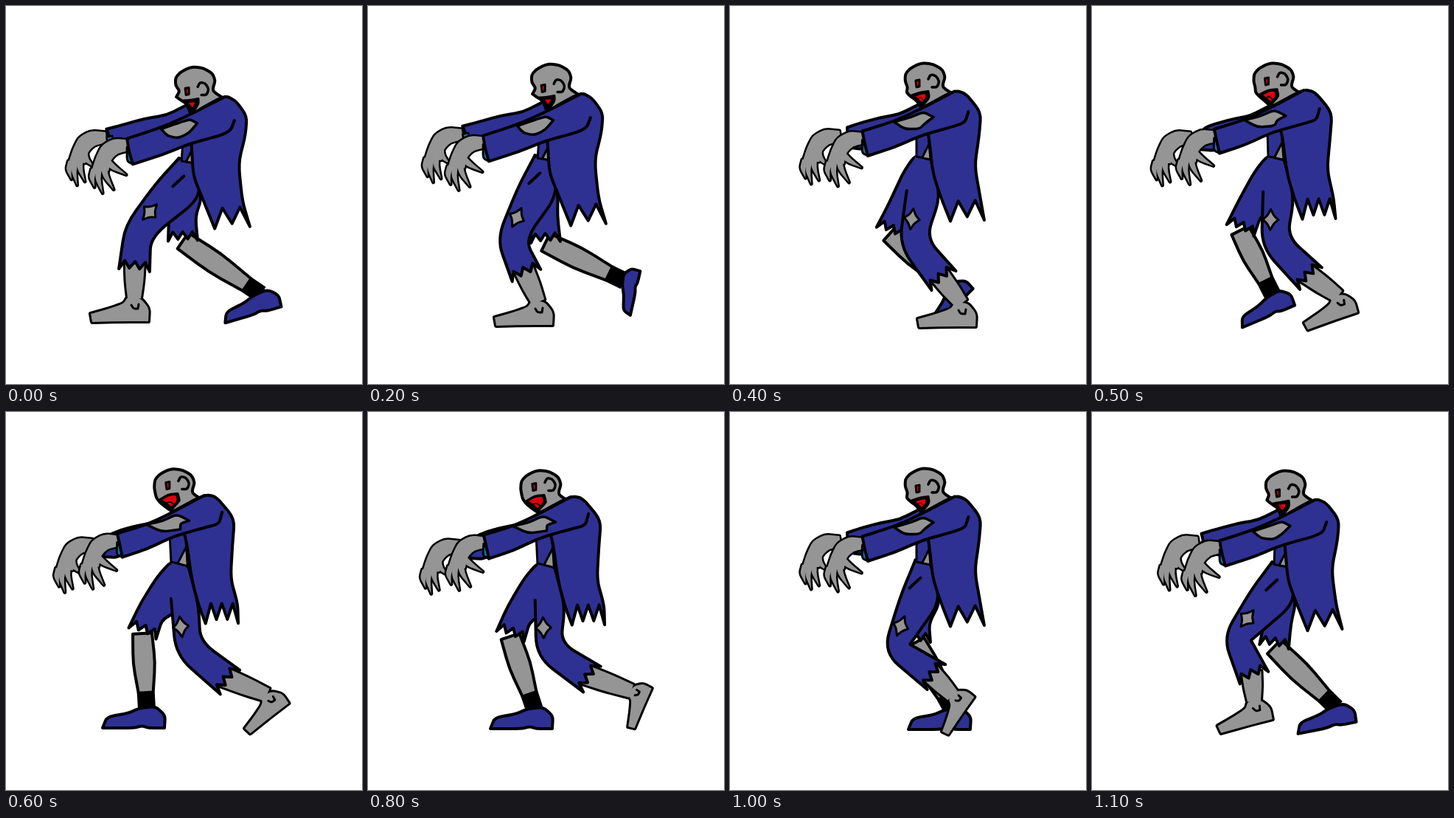
Animation, 483 px wide and 512 px high, one loop 1200 ms. Source, as an HTML page with a canvas:

```html
<!DOCTYPE html>
<html lang="en">
<head>
<meta charset="utf-8">
<title>Zombie walk</title>
<style>
html, body { margin: 0; width: 100%; height: 100%; overflow: hidden; background: #fff; }
canvas { display: block; }
</style>
</head>
<body>
<canvas id="stage" width="483" height="512"></canvas>
<script>
const ctx = document.getElementById('stage').getContext('2d');
const BLUE = '#2e3192', GRAY = '#959595', CYAN = '#0f75bc', RED = '#e0000f', INK = '#000';
const LOOP = 1200, STEP = 100, LINE = 4;

// Key joints. Legs: knee, trouser hem, ankle, foot tilt.
const poses = [
  { at: 0, neck: [297, 121], near: [179, 305, 174, 358, 174, 396, 0], far: [239, 285, 240, 318, 345, 390, -.28] },
  { at: 200, neck: [289, 117], near: [194, 316, 215, 365, 231, 401, 0], far: [239, 285, 241, 320, 347, 372, -1.35] },
  { at: 400, neck: [305, 114], near: [248, 319, 290, 372, 314, 403, 0], far: [232, 275, 217, 308, 300, 382, -.8] },
  { at: 600, neck: [269, 112], near: [247, 320, 304, 366, 354, 383, -.65], far: [198, 268, 185, 300, 191, 402, 0] },
  { at: 800, neck: [275, 114], near: [245, 322, 304, 362, 357, 378, -1.15], far: [205, 272, 193, 304, 226, 403, 0] },
  { at: 1000, neck: [305, 113], near: [226, 320, 280, 359, 302, 384, -.95], far: [252, 285, 252, 312, 302, 404, 0] },
  { at: 1100, neck: [303, 117], near: [197, 307, 220, 360, 220, 392, -.25], far: [252, 285, 247, 318, 331, 400, -.2] }
];

// Upper body, relative to the neck: upright and twisted forms
const body = {
  jacket: [[-47,26, 0,0, 15,8, 29,28, 27,53, 17,90, 22,143, 33,178, -15,181, -33,137, -45,108, -47,66],
           [-43,23, 0,0, 16,2, 42,33, 39,70, 37,115, 47,148, 47,174, 3,174, -6,150, -15,115, -24,52]],
  sleeve: [[0,2, -47,26, -85,43, -134,59, -131,78, -126,94, -85,81, -48,66, -6,55, 7,48, 12,35],
           [0,1, -43,24, -77,40, -117,52, -113,69, -110,84, -77,73, -42,56, 0,44, 21,39, 25,23]],
  farSleeve: [[-163,45, -147,41, -111,31, -80,26, -52,12, -44,30, -127,75, -152,70],
              [-129,56, -110,48, -90,43, -70,39, -43,25, -40,40, -115,86, -137,85]],
  elbow: [[-87,46, -62,37, -48,33, -39,38, -50,52, -66,59, -80,55],
          [-78,40, -57,36, -37,26, -19,35, -31,38, -30,46, -56,50]],
  jaw: [[-49,13, -60,6, -66,2, -61,-6, -67,-14], [-54,16, -61,10, -65,4, -67,-2, -68,-10]],
  mouth: [[-56,7, -46,7, -36,5, -36,12, -44,24, -49,17], [-61,7, -49,-1, -36,-2, -33,8, -44,19, -54,11]],
  vest: [[-58,66, -60,89, -45,91, -48,65], [-46,55, -44,91, -21,97, -24,52]],
  wrists: [[-132,61, -163,49], [-115,55, -150,61]],
  belt: [[-64,85, -46,88], [-43,90, -20,97]]
};
const skull = [-67,-24, -61,-31, -52,-36, -43,-39, -29,-37, -17,-30, -13,-20, -16,-11, -16,-6, -8,0, 0,4];
const ear = [-37,-11, -34,-17, -27,-16, -22,-8, -25,0, -32,0];
const bareFoot = [-9,-2, -14,7, -34,14, -59,21, -57,32, -16,31, 19,31, 20,14, 9,0];
const shoe = [-9,-1, -26,6, -54,11, -60,26, -18,26, -6,23, 2,26, 24,26, 25,9, 12,-3];
const ankleMark = [-4,9, -1,14, 5,14, 6,8];
const palm = [0,0, -20,-2, -36,7, -44,23, -50,42, -27,42, -24,27, -15,18, 2,14];
const fingers = [64, 72, 67, 47];

const add = (p, q, k = 1) => [p[0] + q[0] * k, p[1] + q[1] * k];
const lerp = (p, q, k) => p.map((v, i) => v + (q[i] - v) * k);
const unit = (p, q) => {
  const d = Math.hypot(q[0] - p[0], q[1] - p[1]) || 1;
  return [(q[0] - p[0]) / d, (q[1] - p[1]) / d];
};
const normal = d => [-d[1], d[0]];

// Flat coordinates to points, turned, scaled and moved
function place(flat, [x, y], turn = 0, size = 1) {
  const c = Math.cos(turn) * size, s = Math.sin(turn) * size, out = [];
  for (let i = 0; i < flat.length; i += 2)
    out.push([x + flat[i] * c - flat[i + 1] * s, y + flat[i] * s + flat[i + 1] * c]);
  return out;
}

// Gentle bends are rounded, sharp corners stay sharp
function trace(pts, open) {
  const n = pts.length;
  ctx.beginPath();
  pts.forEach((p, i) => {
    const a = pts[(i + n - 1) % n], b = pts[(i + 1) % n];
    const u = unit(a, p), v = unit(p, b);
    if ((open && (i === 0 || i === n - 1)) || u[0] * v[0] + u[1] * v[1] < .3) return ctx.lineTo(...p);
    ctx.lineTo(...lerp(p, a, .35));
    ctx.quadraticCurveTo(...p, ...lerp(p, b, .35));
  });
  if (!open) ctx.closePath();
}

function fill(pts, color) {
  trace(pts);
  ctx.fillStyle = color;
  ctx.fill();
}

function line(pts, width = LINE, open = true) {
  trace(pts, open);
  ctx.lineWidth = width;
  ctx.stroke();
}

function shape(pts, color, width) {
  fill(pts, color);
  line(pts, width, false);
}

// One outline around several overlapping shapes
function union(shapes, color, width = 6) {
  shapes.forEach(s => line(s, width, false));
  shapes.forEach(s => fill(s, color));
}

// Torn edge from a to b
function rag(a, b, tips, depth) {
  const n = normal(unit(a, b)), last = 2 * tips - 2;
  return Array.from({ length: last + 1 }, (_, i) => {
    const cut = i % 2 ? depth : i && i < last ? depth * .2 : 0;
    return add(lerp(a, b, i / last), n, cut);
  });
}

function limb(a, b, start, mid, end) {
  const n = normal(unit(a, b)), m = lerp(a, b, .5);
  return [add(a, n, start), add(m, n, mid), add(b, n, end),
          add(b, n, -end), add(m, n, -mid), add(a, n, -start)];
}

function finger(base, tip) {
  const d = unit(base, tip), n = normal(d), m = add(lerp(base, tip, .5), [-4, -1]);
  return [add(base, n, 4.5), add(m, n, 3.5), tip, add(m, n, -3.5), add(base, n, -4.5)];
}

function hand(wrist, spread) {
  const claws = fingers.map((y, i) => {
    const reach = [0, 11, 26, 43][i] * spread;
    return finger(add(wrist, [-46 + i * 6, 39 - i * 3]), add(wrist, [-46 + reach, y]));
  });
  union([place(palm, wrist), ...claws], GRAY, 5);
}

// Trousers from belt to torn hem; returns front and back outline in one run
function trousers(belt, crotch, knee, hem, half) {
  const hip = add(lerp(...belt, .5), [0, 28]);
  const thigh = unit(hip, knee), calf = unit(knee, hem);
  const kneeSide = normal(unit([0, 0], add(thigh, calf))), hemSide = normal(calf);
  const front = add(knee, kneeSide, half);
  const cloth = rag(add(hem, hemSide, half + 2), add(hem, hemSide, -half - 2), 4, -12);
  return [belt[0], add(lerp(belt[0], front, .4), normal(thigh), 3), front,
          ...cloth, add(knee, kneeSide, -half), crotch, belt[1]];
}

function joints(leg) {
  const [knee, hem, ankle] = place(leg.slice(0, 6), [0, 0]);
  return { knee, hem, ankle, tilt: leg[6], size: 1 + .2 * leg[6] };
}

function farLeg(leg, belt, crotch) {
  const { knee, hem, ankle, tilt, size } = joints(leg);
  const cuff = add(ankle, unit(hem, ankle), -22);
  shape(limb(hem, cuff, 13, 15, 10), GRAY);
  shape(limb(cuff, ankle, 11, 11, 11), INK, 2);
  shape(place(shoe, ankle, tilt, size), BLUE);
  shape(trousers(belt, crotch, knee, hem, 18), BLUE);
}

function nearLeg(leg, belt, crotch, behind) {
  const { knee, hem, ankle, tilt, size } = joints(leg);
  union([limb(lerp(hem, knee, .15), ankle, 13, 12, 9), place(bareFoot, ankle, tilt, size)], GRAY);
  line(place(ankleMark, ankle, tilt, size), 3);

  const cloth = trousers(belt, crotch, knee, hem, 19);
  fill(cloth, BLUE);
  line(cloth.slice(behind ? 1 : 0));
  if (!behind) line([add(belt[0], [7, 24]), add(belt[0], [-8, 38])]);

  // Torn patch above the knee
  const up = unit(knee, add(lerp(...belt, .5), [0, 28]));
  const spot = add(add(knee, up, 30), normal(up), -6);
  const turn = Math.atan2(up[1], up[0]);
  const tear = Array.from({ length: 8 }, (_, i) => {
    const a = i * Math.PI / 4, r = i % 2 ? 8 : 14;
    return [r * Math.cos(a), r * .75 * Math.sin(a)];
  });
  shape(place(tear.flat(), spot, turn), GRAY, 3);
}

function head(neck, part, twist) {
  const lift = add(neck, [0, 4 * twist]), look = add(neck, [2 * twist, -8 * twist]);
  shape([...place(skull, lift), part.jacket[0], ...part.jaw], GRAY);
  const mouth = part.mouth;
  shape(mouth, INK, 3);
  const centre = mouth.reduce((s, p) => add(s, p, 1 / mouth.length), [0, 0]);
  fill(mouth.map(p => lerp(centre, p, .35 + .4 * twist)), RED);
  line(rag(mouth[0], mouth[3], 3, 6), 2 * twist);
  shape(place([-54,-9, -49,-10, -49,-1, -53,0], look), RED, 3);
  line(place(ear, look), 3.5);
}

function draw(time) {
  let i = poses.length - 1;
  while (poses[i].at > time) i--;
  const a = poses[i], b = poses[(i + 1) % poses.length];
  const k = (time - a.at) / ((b.at || LOOP) - a.at);
  const neck = lerp(a.neck, b.neck, k), near = lerp(a.near, b.near, k), far = lerp(a.far, b.far, k);

  const twist = (1 - Math.cos(2 * Math.PI * (time - 100) / LOOP)) / 2;
  const part = {};
  for (const name in body) part[name] = place(lerp(...body[name], twist), neck);
  const { jacket, sleeve, farSleeve, vest, wrists, belt } = part;
  const crotch = jacket[9];

  ctx.fillStyle = '#fff';
  ctx.fillRect(0, 0, 483, 512);
  ctx.strokeStyle = INK;
  ctx.lineJoin = ctx.lineCap = 'round';

  hand(wrists[1], .7);
  shape(farSleeve, BLUE);
  shape([add(farSleeve[0], [0, 11]), add(farSleeve[0], [8, 9]), farSleeve[7], add(farSleeve[7], [-7, 1])], CYAN, 2.5);

  farLeg(far, belt, crotch);
  nearLeg(near, belt, crotch, far[0] < near[0]);
  shape(vest, BLUE, 3);
  shape([lerp(vest[3], vest[2], .4), lerp(vest[1], vest[2], .4), vest[2]], GRAY, 3);

  head(neck, part, twist);
  const tail = rag(jacket[7], jacket[8], twist > .6 ? 4 : 3, 27);
  shape([...jacket.slice(0, 7), ...tail, ...jacket.slice(9)], BLUE);

  hand(wrists[0], 1);
  shape([add(sleeve[3], [0, 12]), sleeve[4], sleeve[5], add(sleeve[5], [-8, -4])], CYAN, 3);
  fill(sleeve, BLUE);
  line(sleeve);
  shape(part.elbow, GRAY, 3.5);
}

let shown = -1;
function tick() {
  const time = Math.floor(performance.now() % LOOP / STEP) * STEP;
  if (time !== shown) draw(shown = time);
  requestAnimationFrame(tick);
}
tick();
</script>
</body>
</html>
```
